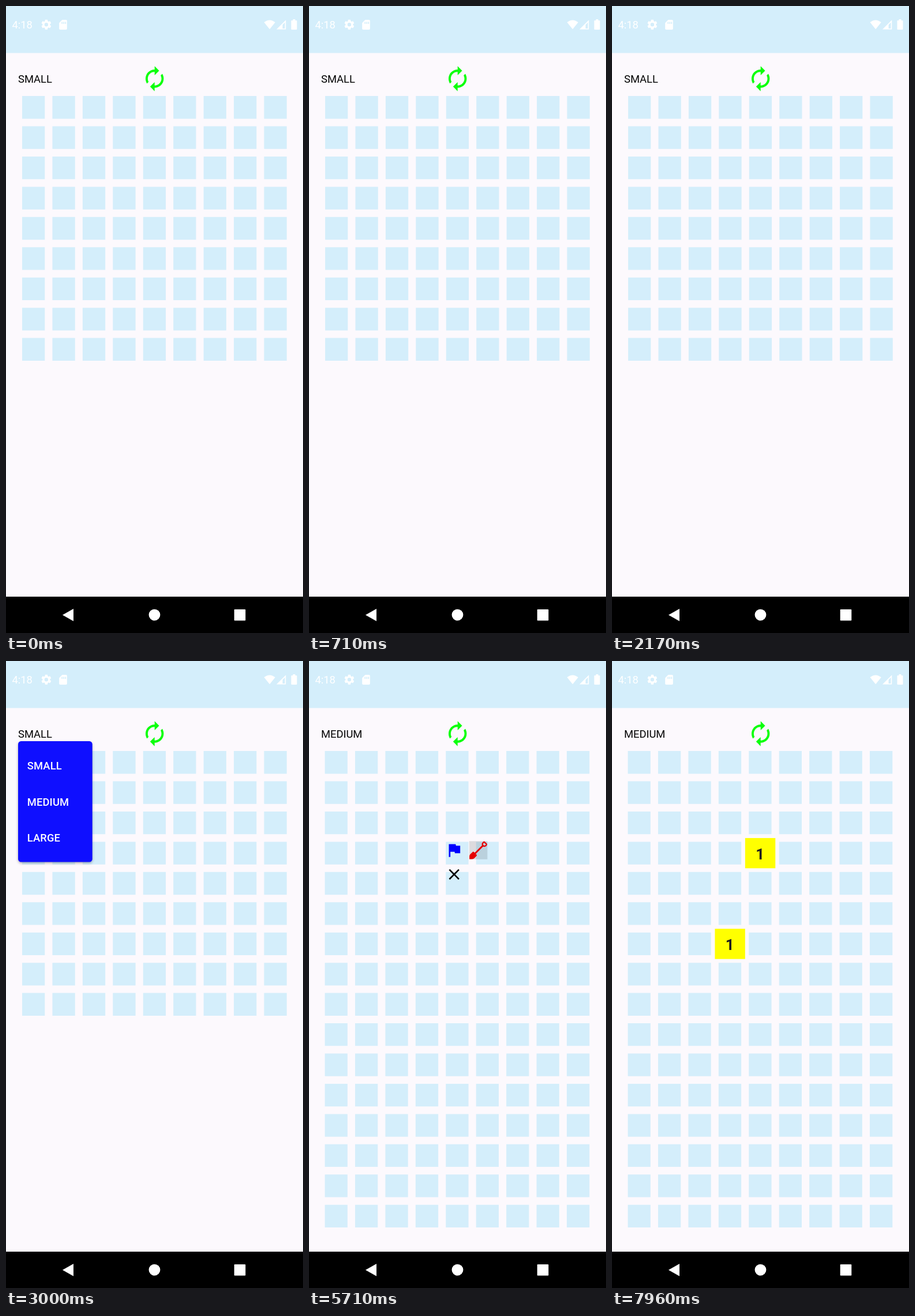
Animation of 515x1087 px, one loop 8 s. Source, as an HTML page:

```html
<!DOCTYPE html>
<html lang="en">
<head>
<meta charset="utf-8">
<title>Field</title>
<style>
  html, body { margin: 0; width: 100%; height: 100%; overflow: hidden; background: #fcf9fd; }
  svg { display: block; width: 100%; height: 100%; }
  text { font: 18.35px Roboto, sans-serif; }
  #menu rect { fill: #0f0fff; filter: drop-shadow(0 2px 2px rgba(0, 0, 0, .3)); }
  #menu text { fill: #fff; font-weight: 500; letter-spacing: .13px; }
  .tile text { font-size: 26.2px; font-weight: 700; fill: #1c1b1f; text-anchor: middle; }
</style>
</head>
<body>
<svg viewBox="0 0 515 1087">
  <defs>
    <g id="one" class="tile">
      <rect width="52.4" height="52.4" fill="#ff0"/>
      <text x="25.8" y="36.6">1</text>
    </g>
  </defs>
  <rect width="515" height="1087" fill="#fcf9fd"/>
  <rect width="515" height="81.5" fill="#d4eefb"/>

  <g fill="#fff">
    <text x="10.5" y="39.3">4:18</text>
    <path transform="translate(59.2 21.6) scale(.89)" fill-rule="evenodd" d="M19.14 12.94c.04-.3.06-.61.06-.94 0-.32-.02-.64-.07-.94l2.03-1.58c.18-.14.23-.41.12-.61l-1.92-3.32c-.12-.22-.37-.29-.59-.22l-2.39.96c-.5-.38-1.03-.7-1.62-.94l-.36-2.54c-.04-.24-.24-.41-.48-.41h-3.84c-.24 0-.43.17-.47.41l-.36 2.54c-.59.24-1.13.57-1.62.94l-2.39-.96c-.22-.08-.47 0-.59.22L2.74 8.87c-.12.21-.08.47.12.61l2.03 1.58c-.05.3-.09.63-.09.94s.02.64.07.94l-2.03 1.58c-.18.14-.23.41-.12.61l1.92 3.32c.12.22.37.29.59.22l2.39-.96c.5.38 1.03.7 1.62.94l.36 2.54c.05.24.24.41.48.41h3.84c.24 0 .44-.17.47-.41l.36-2.54c.59-.24 1.13-.56 1.62-.94l2.39.96c.22.08.47 0 .59-.22l1.92-3.32c.12-.22.07-.47-.12-.61zM12 15.6a3.6 3.6 0 1 1 0-7.2 3.6 3.6 0 0 1 0 7.2z"/>
    <path fill-rule="evenodd" d="M97.5 24H104a1.8 1.8 0 0 1 1.8 1.8v13.4A1.8 1.8 0 0 1 104 41H94a1.8 1.8 0 0 1-1.8-1.8v-9.9zM96.4 27.6v3.4h1.7v-3.4zm3 0v3.4h1.7v-3.4zm3 0v3.4h1.7v-3.4z"/>
    <path d="M447.5 28.2Q457 20.6 466.8 28.2L457.2 40.3z"/>
    <path fill-rule="evenodd" d="M485.3 24.3V40.6H469zM483.6 28.4L479.6 32.4V38.9H483.6z"/>
    <path d="M497.5 23h4v2h1.8q1.2 0 1.2 1.2v13.5q0 1.3-1.2 1.3h-7.6q-1.2 0-1.2-1.3V26.2q0-1.2 1.2-1.2h1.8z"/>
  </g>

  <text id="size" x="21" y="133.4"></text>
  <path transform="translate(234.1 102.4) scale(1.967)" fill="#0bff0b" d="M12 6v3l4-4-4-4v3c-4.42 0-8 3.58-8 8 0 1.57.46 3.03 1.24 4.26L6.7 14.8c-.45-.83-.7-1.79-.7-2.8 0-3.31 2.69-6 6-6zm6.76 1.74L17.3 9.2c.44.84.7 1.79.7 2.8 0 3.31-2.69 6-6 6v-3l-4 4 4 4v-3c4.42 0 8-3.58 8-8 0-1.57-.46-3.03-1.24-4.26z"/>

  <path id="grid" fill="#d4eefb"/>
  <use id="first" href="#one"/>
  <use id="second" href="#one"/>

  <g id="tools">
    <path transform="scale(1.311)" fill="#00f" d="M14.4 6L14 4H5v17h2v-7h5.6l.4 2h7V6z"/>
    <path transform="translate(0 41.9) scale(1.311)" d="M19 6.41L17.59 5 12 10.59 6.41 5 5 6.41 10.59 12 5 17.59 6.41 19 12 13.41 17.59 19 19 17.59 13.41 12z"/>
    <g transform="translate(41.9 0)">
      <rect id="press" width="31.5" height="31.5"/>
      <path fill="#e60000" d="M.3 31.2V26.3Q.3 24 2 22.4L6 18.7Q7 17.8 8 18.8L12.7 23.5Q13.7 24.5 12.8 25.5L9 29.5Q7.4 31.2 5 31.2z"/>
      <path fill="none" stroke="#e60000" stroke-width="2.8" d="M8.5 23L24.5 7"/>
      <path fill="none" stroke="#e60000" stroke-width="2.2" stroke-linejoin="round" d="M23.6 7.9Q21.8 4.8 24 2.6Q25 1.4 26.4 1.6L30 5.2Q30.2 6.6 29 7.6Q26.7 9.7 23.6 7.9z"/>
    </g>
  </g>

  <g id="menu">
    <rect x="21" y="139" width="128.7" height="209.4" rx="5.2"/>
    <text x="36.8" y="187.6">SMALL</text>
    <text x="36.8" y="250.5">MEDIUM</text>
    <text x="36.8" y="313.4">LARGE</text>
  </g>

  <rect y="1024" width="515" height="63"/>
  <g fill="#fff">
    <path d="M98 1055.7L117 1045V1066.4z"/>
    <circle cx="257.5" cy="1055.6" r="9.9"/>
    <rect x="395.7" y="1046" width="19.6" height="19.6" rx="1"/>
  </g>
</svg>
<script>
const LOOP = 8000, CELL = 52.44, TOP = 149.6;
const MENU = { open: 2600, close: 3540 };
const DIGS = [
  { id: 'first', col: 4, row: 3, open: 4900, press: 5630, done: 5790 },
  { id: 'second', col: 3, row: 6, open: 6640, press: 7270, done: 7420 }
];

const $ = id => document.getElementById(id);
const clamp = v => Math.max(0, Math.min(1, v));
const show = (el, on) => el.setAttribute('visibility', on ? 'visible' : 'hidden');
const move = (el, x, y) => el.setAttribute('transform', `translate(${x} ${y})`);
const left = col => 21.1 + col * CELL;
const top_ = row => TOP + row * CELL;

function gridPath(rows, x0) {
  let d = '';
  for (let r = 0; r < rows; r++)
    for (let c = 0; c < 9; c++)
      d += `M${x0 + c * CELL} ${top_(r) + 6.5}h39.3v39.3h-39.3z`;
  return d;
}
const small = gridPath(9, 28), medium = gridPath(16, 27.5);
for (const dig of DIGS) move($(dig.id), left(dig.col), top_(dig.row));

let size;
function setSize(name) {
  if (size === name) return;
  size = name;
  $('size').textContent = name;
  $('grid').setAttribute('d', name === 'SMALL' ? small : medium);
}

function draw(t) {
  setSize(t < MENU.close ? 'SMALL' : 'MEDIUM');

  const grow = 1 - (1 - clamp((t - MENU.open) / 120)) ** 3;
  const fade = clamp((t - MENU.open) / 40) * (1 - clamp((t - MENU.close) / 75));
  const k = .8 + .2 * grow;
  $('menu').setAttribute('transform', `translate(21 139) scale(${k}) translate(-21 -139)`);
  $('menu').setAttribute('opacity', fade);

  const active = DIGS.find(d => t >= d.open && t < d.done);
  show($('tools'), active);
  if (active) {
    move($('tools'), left(active.col) + 5.1, top_(active.row) + 5.4);
    $('press').setAttribute('opacity', .12 * clamp((t - active.press) / 75));
  }
  for (const d of DIGS) show($(d.id), t >= d.done);
}

const start = performance.now();
function tick(now) {
  draw(Math.max(0, now - start) % LOOP);
  requestAnimationFrame(tick);
}
draw(0);
requestAnimationFrame(tick);
</script>
</body>
</html>
```
